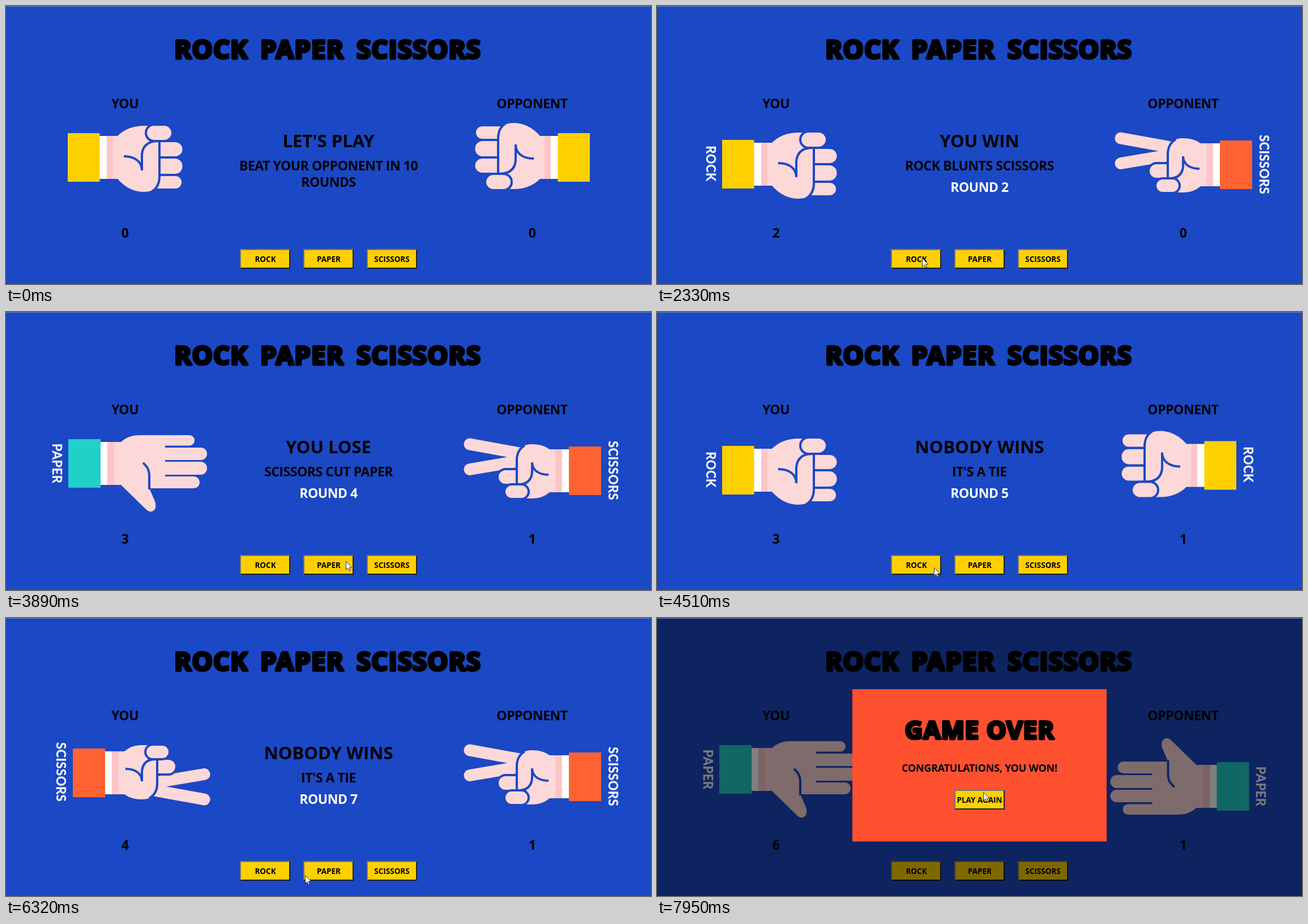
These frames come from a looping animation (1139x492 px, 8000 ms). An HTML page:

```html
<!DOCTYPE html>
<html lang="en">
<head>
<meta charset="utf-8">
<title>Rock Paper Scissors</title>
<style>
  html, body { margin: 0; width: 100%; height: 100%; overflow: hidden; background: #1b48c4; }
  svg { display: block; width: 100vw; height: 100vh; }
  text { font-family: "Open Sans", "Noto Sans", sans-serif; font-weight: 700; text-anchor: middle; }
  .title { font-family: Inter, sans-serif; font-weight: 600; stroke: #000; stroke-width: 4.6; stroke-linejoin: round; letter-spacing: 1.2px; }
  .head { font-size: 31px; }
  .line { font-size: 23px; letter-spacing: -.02em; }
  .note { font-size: 18px; letter-spacing: -.015em; }
  .btn text { font-size: 13.5px; }
  .tag { font-family: Lato, sans-serif; font-size: 22px; letter-spacing: .5px; fill: #f3f5fd; stroke: #f3f5fd; stroke-width: .4; }
  .skin { fill: #fdd8d8; }
  .cut { stroke: #1b48c4; stroke-width: 4; }
  .fold { fill: none; stroke: #1b48c4; stroke-width: 4; stroke-linecap: butt; }
  .btn { --lit: #767676; --dark: #212121; }
  .btn.pressed { --lit: #212121; --dark: #767676; }
</style>
</head>
<body>
<svg viewBox="0 0 1139 492" preserveAspectRatio="none">
  <defs>
    <g id="cuff">
      <rect x="56" y="5" width="14" height="76" fill="#fff"/>
      <rect x="69" y="5" width="13" height="76" fill="#fcc6c8"/>
    </g>

    <g id="rock">
      <use href="#cuff"/>
      <rect width="56.5" height="86" fill="#ffd000"/>
      <g class="skin cut">
        <rect x="145" y="14" width="59.5" height="29" rx="14.5"/>
        <rect x="145" y="43" width="59.5" height="31" rx="15"/>
        <rect x="145" y="74" width="58" height="26" rx="13"/>
      </g>
      <path class="skin" d="M80 5H88Q106 -13 135 -13H150V14H162V76Q162 104 135 104Q108 104 88 81H80Z"/>
      <path class="fold" d="M162 14V76Q162 95 149 103"/>
      <path class="fold" d="M99 41C118 41 131 50 131 66V38Q133 14 160 14"/>
      <rect class="skin cut" x="138" y="-15" width="47" height="29" rx="14.5"/>
    </g>

    <g id="paper">
      <use href="#cuff"/>
      <rect width="57" height="86" fill="#22d0ca"/>
      <g class="skin">
        <rect x="150" y="-7" width="73" height="18.5" rx="9.2"/>
        <rect x="150" y="15" width="95" height="22" rx="11"/>
        <rect x="150" y="40" width="95" height="23" rx="11.5"/>
        <rect x="150" y="66" width="82" height="21" rx="10.5"/>
        <path d="M81 5H93Q106 -7 124 -7H171V87H143L153 110Q157 123 149 127.5Q143 130 137 124L93 81H81Z"/>
      </g>
      <path class="fold" d="M132 42C141 50 143 56 143 66V89"/>
    </g>

    <g id="scissors">
      <use href="#cuff"/>
      <rect width="57" height="86" fill="#ff6331"/>
      <path d="M140 61L232 45.5M130 71.5L232 90" stroke="#fdd8d8" stroke-width="21" stroke-linecap="round"/>
      <rect class="skin cut" x="135" y="18" width="48" height="28" rx="14"/>
      <path class="skin" d="M81 5H91Q104 -6 120 -6H132V19H149V64Q149 90 122 90Q103 90 91 81H81Z"/>
      <path class="fold" d="M149 18V62Q149 80 135 88"/>
      <path class="fold" d="M93 36C110 36 122 44 122 58V40Q124 19 146 19"/>
      <rect class="skin cut" x="128" y="-7" width="43" height="26" rx="13"/>
    </g>

    <g id="face">
      <rect width="89" height="35" fill="#ffd000"/>
      <path d="M0 35V0H89L87 2H2V33Z" style="fill:var(--lit)"/>
      <path d="M89 0V35H0L2 33H87V2Z" style="fill:var(--dark)"/>
    </g>
  </defs>

  <rect width="1139" height="492" fill="#1b48c4"/>
  <g class="title" font-size="45.5">
    <text x="362.5" y="92.6">ROCK</text>
    <text x="523" y="92.6">PAPER</text>
    <text x="729" y="92.6">SCISSORS</text>
  </g>
  <text class="line" x="210" y="181">YOU</text>
  <text class="line" x="929" y="181">OPPONENT</text>

  <use id="youHand"/>
  <use id="oppHand"/>
  <text id="youTag" class="tag"></text>
  <text id="oppTag" class="tag"></text>

  <text id="head" class="head" x="569.5" y="249.5"></text>
  <text id="reason" class="line" x="569.5" y="290.5"></text>
  <text id="extra" class="line" x="569.5"></text>
  <text id="youScore" class="line" x="210" y="410"></text>
  <text id="oppScore" class="line" x="929" y="410"></text>

  <g id="btn-rock" class="btn" transform="translate(413 430)">
    <use href="#face"/><text x="45" y="23">ROCK</text>
  </g>
  <g id="btn-paper" class="btn" transform="translate(525 430)">
    <use href="#face"/><text x="45" y="23">PAPER</text>
  </g>
  <g id="btn-scissors" class="btn" transform="translate(637 430)">
    <use href="#face"/><text x="44.5" y="23">SCISSORS</text>
  </g>

  <g id="modal">
    <rect width="1139" height="492" opacity=".5"/>
    <rect x="345" y="126" width="449" height="269.5" fill="#ff5030"/>
    <g class="title" font-size="43.5">
      <text x="570" y="214">GAME OVER</text>
    </g>
    <text class="note" x="569.5" y="271.5">CONGRATULATIONS, YOU WON!</text>
    <g class="btn" transform="translate(525 304)">
      <use href="#face"/><text x="44.5" y="23">PLAY AGAIN</text>
    </g>
  </g>

  <rect width="1139" height="1" fill="#7585b0"/>
  <g id="cursor">
    <circle id="glow" r="11.5" fill="#ece000" opacity=".65"/>
    <path d="M.5 .5V15L3.7 12L6.2 17L8.4 16L6.1 11.2H10.8Z" fill="#fff" stroke="#222" stroke-width=".9"/>
  </g>
</svg>

<script>
const LOOP = 8000, MODAL_AT = 7430, GLOW = 100;
const $ = id => document.getElementById(id);

// press time, result time, your hand, opponent's hand
const rounds = [
  [1310, 1480, 'paper', 'rock'],
  [2170, 2260, 'rock', 'scissors'],
  [3080, 3170, 'scissors', 'paper'],
  [3730, 3820, 'paper', 'scissors'],
  [4440, 4510, 'rock', 'rock'],
  [5050, 5140, 'paper', 'rock'],
  [5510, 5600, 'scissors', 'scissors'],
  [6370, 6460, 'paper', 'rock'],
  [6870, 6950, 'rock', 'scissors'],
  [7340, 7430, 'paper', 'paper']
];
const beats = {
  paper: ['rock', 'WRAPS'],
  rock: ['scissors', 'BLUNTS'],
  scissors: ['paper', 'CUT']
};

// sleeve corner, then label baseline and centre
const places = {
  you: { start: [109, 225], rock: [115, 237, 86.5, 279], paper: [110, 225, 81.5, 268], scissors: [118, 231, 88.5, 272.5] },
  opp: { start: [1031, 311], rock: [1023, 314.5, 1035.5, 270], paper: [1045.5, 341, 1058, 298], scissors: [1051, 324, 1064, 280.5] }
};

// pointer moves: first step, last step, number of steps, end point
const moves = [
  [210, 210, 1, 807, 478], [310, 310, 1, 789, 473],
  [580, 740, 3, 602, 455], [1060, 1130, 2, 605, 455],
  [1680, 2090, 6, 468, 446], [2470, 3000, 8, 644, 441],
  [3480, 3650, 3, 600, 441], [4030, 4200, 3, 469, 454],
  [4280, 4280, 1, 489, 452], [4650, 4970, 5, 553, 452],
  [5280, 5440, 3, 660, 443], [5760, 6290, 7, 528, 455],
  [6620, 6790, 3, 495, 452], [7030, 7270, 4, 572, 446],
  [7510, 7950, 7, 576, 308]
];

function verdict(you, opp) {
  if (you === opp) return ['NOBODY WINS', "IT'S A TIE", 0, 0];
  const won = beats[you][0] === opp;
  const [best, worst] = won ? [you, opp] : [opp, you];
  const reason = `${best} ${beats[best][1]} ${worst}`.toUpperCase();
  return won ? ['YOU WIN', reason, 1, 0] : ['YOU LOSE', reason, 0, 1];
}

function showHand(side, hand) {
  const [x, y, base, mid] = places[side][hand || 'start'];
  const use = $(side + 'Hand'), tag = $(side + 'Tag');
  use.setAttribute('href', '#' + (hand || 'rock'));
  use.setAttribute('transform', `translate(${x} ${y}) rotate(${side === 'opp' ? 180 : 0})`);
  tag.textContent = (hand || '').toUpperCase();
  if (hand) tag.setAttribute('transform', `translate(${base} ${mid}) rotate(90)`);
}

function showRound(n) {
  let head = "LET'S PLAY", reason = 'BEAT YOUR OPPONENT IN 10', won = 0, lost = 0;
  for (const [, , you, opp] of rounds.slice(0, n)) {
    const result = verdict(you, opp);
    [head, reason] = result;
    won += result[2];
    lost += result[3];
  }
  $('head').textContent = head;
  $('reason').textContent = reason;
  $('extra').textContent = n ? 'ROUND ' + n : 'ROUNDS';
  $('extra').setAttribute('y', n ? 328.5 : 319.5);
  $('extra').setAttribute('fill', n ? '#fff' : '#000');
  $('youScore').textContent = won;
  $('oppScore').textContent = lost;
  const [, , you, opp] = rounds[n - 1] || [];
  showHand('you', you);
  showHand('opp', opp);
}

function pointer(t) {
  let at = null;
  for (const [from, to, steps, x, y] of moves) {
    if (t < from) break;
    const step = t >= to ? steps : 1 + Math.floor((t - from) / (to - from) * (steps - 1));
    const k = step / steps;
    at = at ? [at[0] + (x - at[0]) * k, at[1] + (y - at[1]) * k] : [x, y];
  }
  return at;
}

const show = (id, on) => { $(id).style.display = on ? '' : 'none'; };
let shown = -1;

function render(t) {
  const n = rounds.filter(r => t >= r[1]).length;
  if (n !== shown) showRound(shown = n);

  const press = rounds.find(r => t >= r[0] && t < r[1]);
  for (const name in beats) {
    $('btn-' + name).classList.toggle('pressed', !!press && press[2] === name);
  }
  show('modal', t >= MODAL_AT);

  const at = pointer(t);
  show('cursor', at);
  if (at) $('cursor').setAttribute('transform', `translate(${at})`);
  show('glow', press && t - press[0] < GLOW);
}

const start = performance.now();
function tick() {
  render((performance.now() - start) % LOOP);
  requestAnimationFrame(tick);
}
tick();
</script>
</body>
</html>
```
